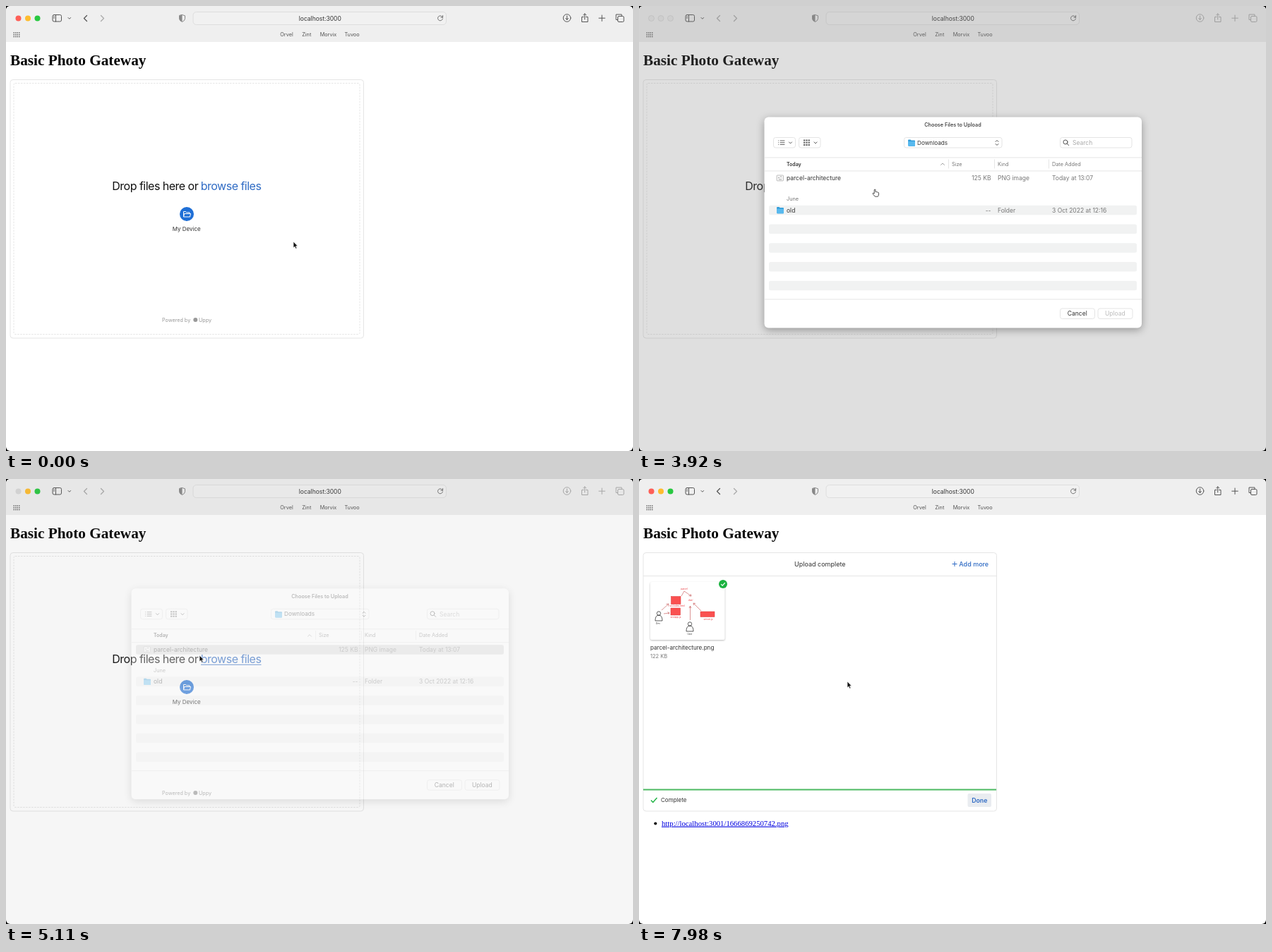
Write an HTML page that moves like this. It is 888x631 px and loops after 8000 ms.

```html
<!DOCTYPE html>
<html lang="en">
<head>
<meta charset="utf-8">
<title>Image upload</title>
<style>
  html, body { margin: 0; width: 100%; height: 100%; overflow: hidden; background: #000; }
  svg { display: block; font: 8.5px Inter, sans-serif; fill: #333; }
  .line { fill: none; stroke: #555; stroke-linecap: round; stroke-linejoin: round; }
  .mid { text-anchor: middle; }
  .grey { fill: #777; }
  .blue { fill: #2f6bc4; }
  .small { font-size: 7.3px; }
  .label { font-size: 9px; }
  .prompt { font-size: 16px; letter-spacing: -.032em; }
  .serif { font-family: "Liberation Serif", serif; }
  .control { fill: #fff; stroke: #dedede; stroke-width: .8; }
  .rule { fill: none; stroke: #e5e5e5; }
  .sheet { fill: #fff; filter: drop-shadow(0 3px 6px #0005); }
  .card { fill: #fff; filter: drop-shadow(0 1px 1px #0004); }
  .tiny { font-size: 3.2px; fill: #e8343c; text-anchor: middle; }
</style>
</head>
<body>
<svg width="888" height="631" viewBox="0 0 888 631">
  <defs>
    <g id="folder">
      <path d="M0 1.5q0-1 1-1h2.5l1 1H9q1 0 1 1V9q0 .8-1 .8H1Q0 9.800 9V1.500z" fill="#2f9bd8"/>
      <rect y="3" width="10" height="6.800" rx=".8" fill="#58b9ee"/>
    </g>
    <g id="person" fill="none" stroke="#333" stroke-width=".8">
      <circle cy="-4.500" r="2.700"/>
      <path d="M-5 6q0-6 3-7.500h4q3 1.500 3 7.500z"/>
    </g>
  </defs>

  <rect width="888" height="631" rx="6" fill="#fff"/>
  <path d="M0 51V6q0-6 6-6h876q6 0 6 6v45z" fill="#efefef"/>

  <!-- Toolbar -->
  <g id="lights" stroke-width=".8">
    <circle cx="17.500" cy="17.500" r="4"/>
    <circle cx="31" cy="17.500" r="4"/>
    <circle cx="44.500" cy="17.500" r="4"/>
  </g>
  <g class="line">
    <rect x="66" y="12.500" width="12.500" height="9.500" rx="2"/>
    <path d="M70.500 12.500V22M67.700 15h1M67.700 17h1M88 16.500l1.800 1.800 1.800-1.800"/>
    <path d="M134.500 13.500l4 4-4 4" stroke="#aaa" stroke-width="1.300"/>
    <path d="M249.500 12.500l4 1.300v4q0 3-4 4.700-4-1.700-4-4.700v-4z" stroke="#888"/>
    <g id="actions">
      <path d="M114.500 13.500l-4 4 4 4" stroke-width="1.300"/>
      <circle cx="794.500" cy="17" r="5.300"/>
      <path d="M794.500 14v5.500m-2-2 2 2 2-2"/>
      <path d="M818 15.500h-2.500v7h8.500v-7h-2.500M819.700 19v-8m-2.200 2 2.200-2 2.200 2M844 13v8.500M839.700 17.200h8.600"/>
      <path d="M866.500 19.500h-2.500v-7.500h8v2"/>
      <rect x="866.500" y="14.500" width="8.500" height="8" rx="1.500"/>
    </g>
  </g>
  <path d="M249.500 12.500v10q-4-1.700-4-4.700v-4z" fill="#888"/>
  <rect x="265" y="8.500" width="358.500" height="18" rx="4.500" fill="#f1f1f1" stroke="#dedede"/>
  <text class="mid" x="444.800" y="20.800">localhost:3000</text>
  <path class="line" d="M618.300 16a3.500 3.500 0 1 0 .2 2M618.600 13.500v2.700H616" stroke-width=".8"/>
  <path d="M10.500 38h9M10.500 40.700h9M10.500 43.400h9" stroke="#666" stroke-width="1.500" stroke-dasharray="1.500 1"/>
  <g class="small mid" fill="#555">
    <text x="397.500" y="43">Orvel</text><text x="425.800" y="43">Zint</text>
    <text x="456.500" y="43">Morvix</text><text x="490" y="43">Tuvoo</text>
  </g>

  <text class="serif" x="6" y="84" font-size="21.250" font-weight="700" fill="#000">Basic Photo Gateway</text>
  <rect class="rule" x="6" y="104.500" width="500.500" height="366.500" rx="4"/>

  <g id="dropArea">
    <g id="afterglow">
      <path d="M6 104.500h500v366H6zM178 145v298h322V145z" fill="#f5f5f5" fill-rule="evenodd"/>
      <svg width="501" height="631"><use href="#stripes" y="-20"/></svg>
    </g>
    <rect class="rule" x="11" y="109.500" width="490" height="356" rx="2" stroke-dasharray="2.500 1.500"/>
    <text class="prompt" x="150.300" y="260.700" fill="#111">Drop files here or</text>
    <text class="prompt blue" x="275.800" y="260.700">browse files</text>
    <path id="underline" d="M276 263.300h85.500" stroke="#2f6bc4"/>
    <circle cx="256" cy="295" r="10" fill="#1f6fd6"/>
    <path d="M251.500 299v-7.500h3l1 1.300h4.500v1.700M251.500 299l1-4.500h9l-1 4.500z" fill="none" stroke="#fff" stroke-linejoin="round"/>
    <text class="mid" x="255.800" y="318.600" font-size="8">My Device</text>
    <g font-size="7.200" fill="#999">
      <text x="221" y="447.500">Powered by</text>
      <circle cx="268.300" cy="445" r="3"/>
      <text x="273" y="447.500">Uppy</text>
    </g>
  </g>

  <g id="fileList">
    <path class="rule" d="M6 137.500h500"/>
    <path d="M443.500 120.500h7M447 117v7" stroke="#2f6bc4"/>
    <text class="label blue" x="453.300" y="124" font-weight="500">Add more</text>
    <rect class="card" x="16" y="146" width="105.500" height="82" rx="2"/>
    <g fill="#fa5050" stroke="#d33" stroke-width=".5">
      <rect x="45.500" y="166.500" width="13.500" height="11"/>
      <rect x="45" y="183" width="13.500" height="10"/>
      <rect x="87" y="188" width="20" height="7.500"/>
    </g>
    <path d="M32 186l10-9m-3.500.5 3.500-.5-.5 3.500M35 191l8-1m-2.500-1.500 2.500 1.500-2 1.500M60 166l4-7 10 7m-1-3 1 3-3.500-.5M72.500 200v-20m-1.500 3 1.500-3 1.500 3M88 187l-11-11m.5 3-.5-3 3 .5" fill="none" stroke="#c66" stroke-width=".7"/>
    <use href="#person" x="28" y="195"/>
    <use href="#person" x="72" y="210"/>
    <g class="tiny">
      <text x="64" y="157">parcel</text><text x="73" y="173">dist/</text>
      <text x="54" y="181">src/index.html</text><text x="52" y="196.500">src/app.js</text>
      <text x="98" y="199.500">server.js</text>
      <text x="27" y="206" fill="#333">Dev</text><text x="72" y="220.500" fill="#333">User</text>
    </g>
    <text x="16" y="242" font-size="8.100">parcel-architecture.png</text>
    <text class="grey" x="16" y="254" font-size="7.500">122 KB</text>

    <g id="ready">
      <text class="label blue" x="16" y="124">Cancel</text>
      <text class="label mid" x="256" y="124.200">1 file selected</text>
      <circle cx="120.300" cy="148.300" r="6" fill="#111"/>
      <path d="M118 146l4.600 4.600m0-4.600-4.600 4.600" stroke="#fff" stroke-width="1.200"/>
      <path class="rule" d="M6 428h500"/>
      <rect id="focusRing" x="15" y="435" width="86" height="28.500" rx="4" fill="#8ab6ee"/>
      <rect x="16.500" y="436.500" width="83" height="25.500" rx="2.500" fill="#1bb240"/>
      <text class="mid" x="58" y="452.500" font-size="8.800" font-weight="600" fill="#fff">Upload 1 file</text>
    </g>

    <g id="complete">
      <text class="label mid" x="256.300" y="124.200">Upload complete</text>
      <circle cx="119" cy="149" r="6" fill="#1bb240"/>
      <path d="M116.200 149.200l2 2 3.600-4" fill="none" stroke="#fff" stroke-width="1.200"/>
      <path d="M6 440.500h500" stroke="#4cb963" stroke-width="1.800"/>
      <path d="M17 455.500l2.800 3 5.700-6.500" fill="none" stroke="#1bb240" stroke-width="1.400"/>
      <text x="31" y="458.300" font-size="8">Complete</text>
      <rect x="465.500" y="446" width="33.500" height="19" rx="2" fill="#e9ecf0"/>
      <text class="blue mid" x="482.300" y="458.500" font-size="8.800" font-weight="600">Done</text>
      <circle cx="23.300" cy="488.500" r="2" fill="#000"/>
      <text class="serif" x="32" y="491.700" font-size="10.700" fill="#0000e0" text-decoration="underline">http://localhost:3001/1666869250742.png</text>
    </g>
  </g>

  <rect id="dim" width="888" height="631" rx="6" fill="#808080"/>

  <!-- File chooser -->
  <g id="dialog">
    <rect class="sheet" x="177.500" y="165" width="534.500" height="299" rx="6"/>
    <text class="small mid" x="444.500" y="178.700" font-weight="500">Choose Files to Upload</text>
    <g class="control">
      <rect x="190.500" y="194" width="31" height="14.500" rx="3"/>
      <rect x="226.500" y="194" width="30.500" height="14.500" rx="3"/>
      <rect x="375.500" y="194" width="138.500" height="14.500" rx="3"/>
      <rect x="596.500" y="194" width="101.500" height="14.500" rx="3"/>
      <rect x="596.500" y="436.500" width="49" height="14.500" rx="3"/>
      <rect x="650" y="436.500" width="49" height="14.500" rx="3"/>
    </g>
    <g class="line">
      <path d="M200 198.500h6M200 201.300h6M200 204h6M197.500 198.500h.1M197.500 201.300h.1M197.500 204h.1" stroke-width=".9"/>
      <path d="M212.500 200.500l2 2 2-2M248 200.500l2 2 2-2M505 200l2-2 2 2M505 203l2 2 2-2"/>
      <circle cx="604" cy="200.500" r="3"/><path d="M606.200 202.700l2.500 2.500"/>
      <path d="M427.500 233l2.500-2.500 2.500 2.500" stroke="#888" stroke-width=".8"/>
    </g>
    <path d="M233 198h9M233 201.300h9M233 204.600h9" stroke="#666" stroke-width="2" stroke-dasharray="2.300 1"/>
    <use href="#folder" x="381" y="196.500"/>
    <text x="394" y="204.200" font-size="8.200">Downloads</text>
    <text x="614" y="204.500" fill="#aaa">Search</text>
    <path class="rule" d="M178 222.500h534M178 241.500h534M178 423.500h534M438.500 225v13M503.500 225v13M580.500 225v13"/>
    <g class="small grey">
      <text x="209" y="234.200" font-size="7" font-weight="600" fill="#333">Today</text>
      <text x="443" y="234.200">Size</text><text x="508" y="234.200">Kind</text>
      <text x="585" y="234.200">Date Added</text><text x="209" y="283.700">June</text>
    </g>
    <rect id="selection" x="184" y="245" width="521" height="13.500" rx="2.500" fill="#d8d8d8"/>
    <g id="stripes" fill="#f1f2f2"></g>
    <rect x="195" y="247.500" width="9.500" height="8" rx="1" fill="#f4f4f4" stroke="#aaa" stroke-width=".7"/>
    <path d="M197 251h2m1-1.500h2M198 253.500h4" stroke="#999" stroke-width=".8"/>
    <use href="#folder" x="195" y="292"/>
    <text x="209" y="254.900">parcel-architecture</text><text x="209" y="300.200">old</text>
    <g class="grey">
      <text x="498.500" y="254.900" text-anchor="end">125 KB</text><text x="508" y="254.900">PNG image</text>
      <text x="585" y="254.900">Today at 13:07</text>
      <text x="498.500" y="300.200" text-anchor="end">--</text><text x="508" y="300.200">Folder</text>
      <text x="585" y="300.200">3 Oct 2022 at 12:16</text>
    </g>
    <text class="mid" x="620.800" y="446.700">Cancel</text>
    <text id="uploadLabel" class="mid" x="674.300" y="446.700">Upload</text>
  </g>

  <g id="cursor">
    <path id="arrow" d="M0 0v9l2-1.800 1.400 3 1.600-.7-1.400-2.900H6.200z" fill="#111" stroke="#fff" stroke-width=".7"/>
    <path id="hand" d="M-.8 6V1q0-1 .9-1t.9 1v2.500q1.300-.6 1.600.3 1.300-.5 1.500.5 1.400-.3 1.400 1V7q0 2-1.200 3.200H.3L-2.800 6.500q-.6-1.300.6-1.200z" fill="#fff" stroke="#222" stroke-width=".8" stroke-linejoin="round"/>
  </g>
</svg>
<script>
const DURATION = 8000, STEP = 70;
const OPEN = 3850, CLOSE = 4950, LISTED = 5320, ACTIVE = 5530, UPLOADED = 6510;
const $ = id => document.getElementById(id);
const clamp = v => Math.min(1, Math.max(0, v));
const progress = (t, start, length) => clamp((t - start) / length);
const show = (id, on) => { $(id).style.display = on ? '' : 'none'; };
const within = (t, from, to) => t >= from && t < to;

// Each move: start, end, and the cursor position reached.
const cursorStart = [407, 334];
const cursorMoves = [
  [70, 700, 334, 260],
  [4060, 4400, 274, 250],
  [5390, 5880, 70, 438],
  [6930, 7600, 295, 287]
];

$('stripes').innerHTML = Array.from({ length: 5 }, (_, i) =>
  `<rect x="184" y="${290.3 + 26.75 * i}" width="521" height="13.500" rx="2.500"/>`).join('');

function cursorAt(t) {
  let [x, y] = cursorStart;
  for (const [start, end, toX, toY] of cursorMoves) {
    const p = progress(t, start, end - start);
    const eased = p * p * (3 - 2 * p);
    x += (toX - x) * eased;
    y += (toY - y) * eased;
  }
  return [x, y];
}

function paintToolbar(t) {
  const inactive = within(t, OPEN, 4900);
  const closing = within(t, 4900, ACTIVE);
  ['#fe5f57', '#febc2e', '#28c840'].forEach((color, i) => {
    const light = $('lights').children[i];
    light.setAttribute('fill', inactive ? '#e8e8e8' : closing && i === 0 ? '#d8d8d8' : color);
    light.setAttribute('stroke', inactive ? '#d2d2d2' : 'none');
  });
  $('actions').setAttribute('opacity', inactive || closing ? .45 : 1);
}

function paintDialog(t) {
  const opening = 1 - progress(t, OPEN, 210);
  const closing = progress(t, CLOSE, 240);
  const lift = 17 * opening ** 2 + 22 * closing ** 2;
  show('dialog', within(t, OPEN, 5250));
  $('dialog').setAttribute('opacity', progress(t, 3780, 140) * (1 - closing));
  $('dialog').setAttribute('transform', `translate(0 ${-lift})`);
  $('dim').setAttribute('opacity', .34 * progress(t, 3780, 190) * (1 - progress(t, 4970, 180)));
  show('selection', t >= 4480);
  $('uploadLabel').setAttribute('fill', t >= 4480 ? '#333' : '#bbb');
}

function render(t) {
  paintToolbar(t);
  paintDialog(t);
  show('dropArea', t < LISTED);
  show('afterglow', within(t, 5180, LISTED));
  show('underline', t >= 630);
  show('fileList', t >= LISTED);
  show('ready', t < UPLOADED);
  show('focusRing', t >= 6160);
  show('complete', t >= UPLOADED);

  const hand = within(t, 630, 4060) || within(t, 5810, UPLOADED);
  show('hand', hand);
  show('arrow', !hand);
  $('cursor').setAttribute('transform', `translate(${cursorAt(t)})`);
}

function tick() {
  const t = performance.now() % DURATION;
  render(Math.floor(t / STEP) * STEP);
  requestAnimationFrame(tick);
}
tick();
</script>
</body>
</html>
```
